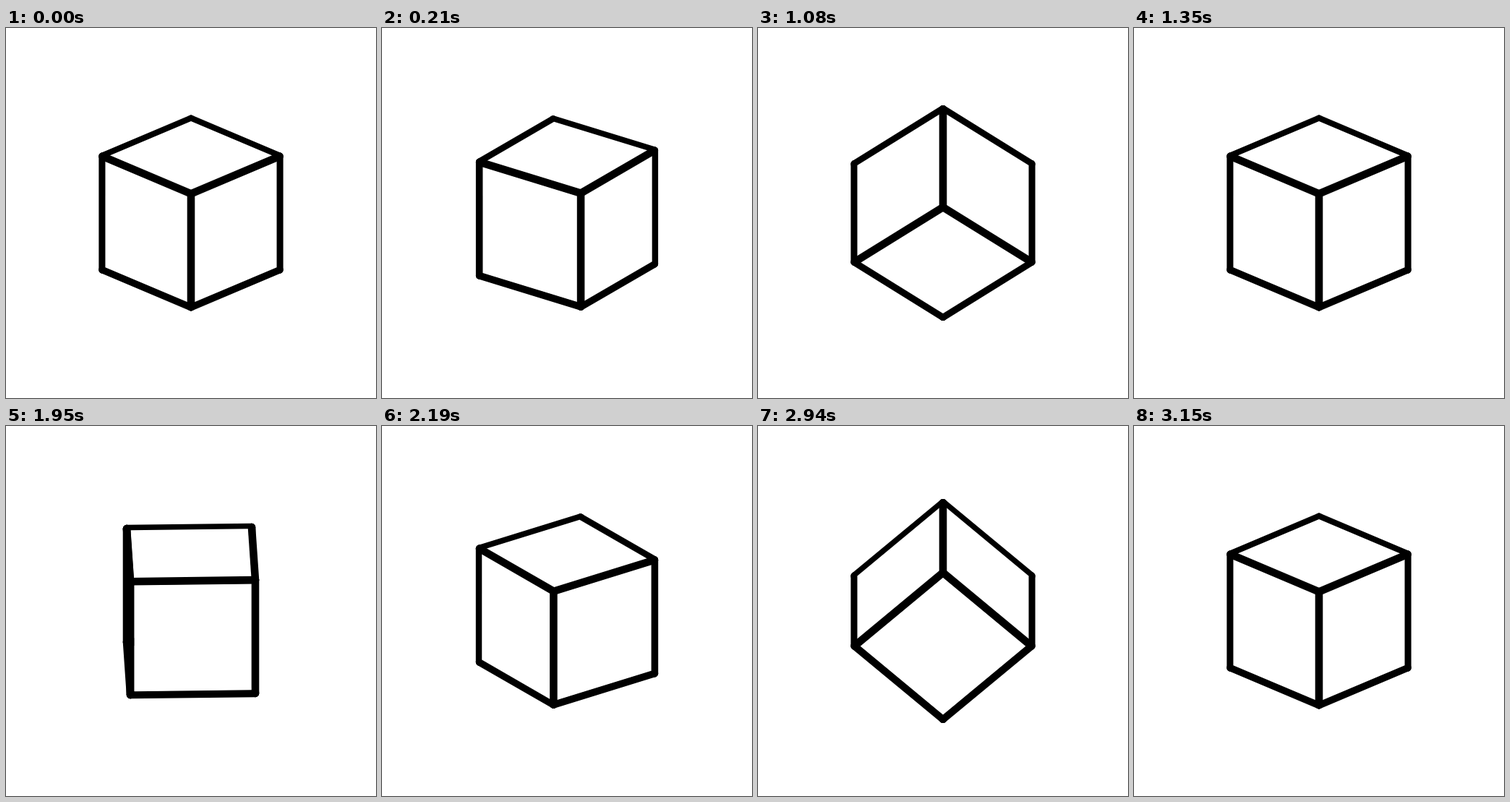
An HTML page with a canvas that plays this animation: 512 px wide and 512 px high, repeating every 3.63 s.

```html
<!DOCTYPE html>
<html>
<head>
<meta charset="utf-8">
<title>Turning cube</title>
<style>
html, body { margin: 0; height: 100%; overflow: hidden; background: #fff; }
canvas { display: block; width: 100vw; height: 100vh; }
</style>
</head>
<body>
<canvas id="stage" width="512" height="512"></canvas>
<script>
const ctx = document.getElementById("stage").getContext("2d");
const HALF = 86.5, R = 5.3, SIGNS = [-1, 1], RAD = Math.PI / 180;
const LOOP = 3630, TURN = 900, STEP = 30, STEPS = 15;
// Half turns as [yaw, tilt]: left, up, right, down
const TURNS = [[-180, 0], [0, -180], [180, 0], [0, 180]];

function pose(ms) {
  const turn = Math.min(3, Math.floor(ms / TURN));
  const p = Math.min(1, Math.floor((ms - turn * TURN) / STEP) / STEPS);
  const ease = p * p * (3 - 2 * p);
  return [45 + TURNS[turn][0] * ease, 25 + TURNS[turn][1] * ease];
}

function projector(yaw, tilt) {
  const cy = Math.cos(yaw * RAD), sy = Math.sin(yaw * RAD);
  const ct = Math.cos(tilt * RAD), st = Math.sin(tilt * RAD);
  return ([x, y, z]) => {
    const depth = z * cy - x * sy;
    return [256 + x * cy + z * sy, 256 - y * ct + depth * st, depth * ct + y * st];
  };
}

// Point with value a on the given axis, b and c on the two others
function point(axis, a, b, c) {
  const v = [];
  v[axis] = a;
  v[(axis + 1) % 3] = b;
  v[(axis + 2) % 3] = c;
  return v;
}

function path(points) {
  ctx.beginPath();
  points.forEach(([x, y]) => ctx.lineTo(x, y));
}

function draw(ms) {
  const project = projector(...pose(ms));
  const faces = [], edges = [];
  const visible = (axis, sign) => project(point(axis % 3, sign, 0, 0))[2] > 1e-6;

  for (let axis = 0; axis < 3; axis++) {
    for (const u of SIGNS) {
      if (visible(axis, u)) {
        const i = HALF - R;
        faces.push([[-i, -i], [i, -i], [i, i], [-i, i]]
          .map(([b, c]) => project(point(axis, u * HALF, b, c))));
      }
      for (const v of SIGNS) {
        edges.push({
          ends: SIGNS.map(s => project(point(axis, s * HALF, u * HALF, v * HALF))),
          front: visible(axis + 1, u) && visible(axis + 2, v)
        });
      }
    }
  }

  const stroke = edge => { path(edge.ends); ctx.stroke(); };
  ctx.fillStyle = "#fff";
  ctx.fillRect(0, 0, 512, 512);
  ctx.lineWidth = 2 * R;
  ctx.lineCap = "round";
  // Bars, then the faces hiding their inner parts, then the bars in front
  edges.forEach(stroke);
  faces.forEach(face => { path(face); ctx.fill(); });
  edges.filter(edge => edge.front).forEach(stroke);
}

const start = performance.now();
function tick() {
  draw((performance.now() - start) % LOOP);
  requestAnimationFrame(tick);
}
tick();
</script>
</body>
</html>
```
